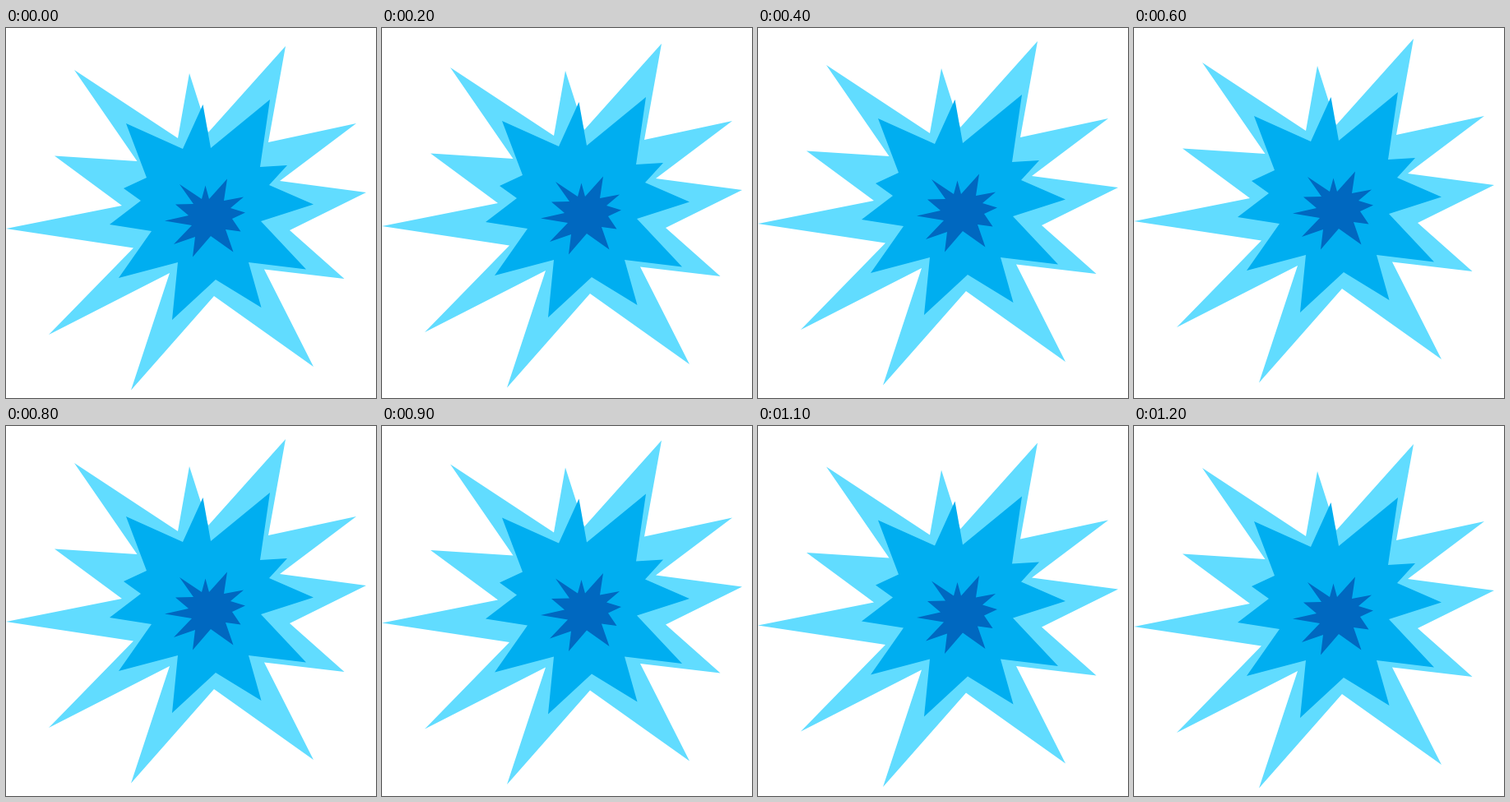
An HTML page that plays this animation: 450 by 450 pixels, repeating every 1300 ms.

```html
<!DOCTYPE html>
<html lang="en">
<head>
<meta charset="utf-8">
<title>Blue burst</title>
<style>
html, body { margin: 0; width: 100%; height: 100%; overflow: hidden; background: #fff; }
svg { display: block; width: 100%; height: 100%; }
</style>
</head>
<body>
<svg viewBox="0 0 450 450">
  <g id="burst">
    <polygon fill="#61dcff" points="340,22 319,139 426,116 333,186 438,200 345,246 411.5,305 314,293.5 374,412 253,326 152,440.5 199,298 52,373 155,267.5 0,244 141,216 59,155.5 159.5,162 83,51 209,134 223,55 246,127"/>
    <polygon fill="#00aef0" points="239.5,93 249,146 321,87 309,169 342,167 320,191 374,214.5 310,235 365,293.5 295,285 310.5,340 255,306 202,355 209,285 137,304 177,247 126,239 164,210 143,195 171,182 146,116 215,147"/>
    <polygon fill="#0068c0" points="242.5,191.5 247,208 269,183.5 265,210 289,205.5 273,219 291,224.5 275,232 285.5,247.5 267,245 276.5,272.5 249,253 227,278.5 230,254 204,263 226,240 193,234.5 222,228 206,214.5 228,214 211,190 238,208"/>
  </g>
</svg>
<script>
const STEP = 100, HALF = 6, RISE = 1.5, LOOP = 1300;
const burst = document.getElementById('burst');
const start = performance.now();

// Rises in six steps, then sinks back in six.
function draw(now) {
  const step = Math.floor((Math.max(0, now - start) % LOOP) / STEP);
  const lift = RISE * (HALF - Math.abs(HALF - step));
  burst.setAttribute('transform', `translate(0 ${-lift})`);
  requestAnimationFrame(draw);
}
draw(start);
</script>
</body>
</html>
```
